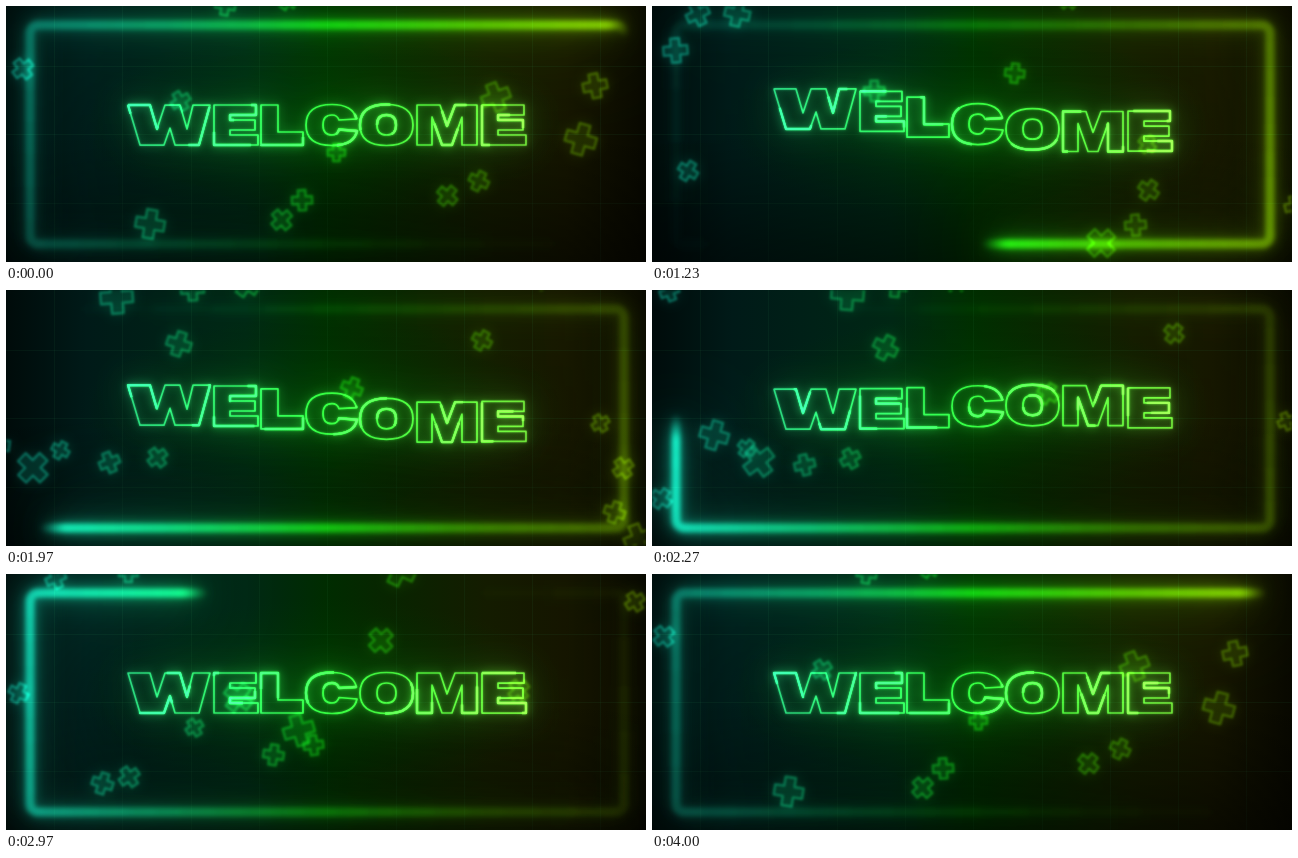
These frames come from a looping animation (640 px wide and 256 px high, 4030 ms). An HTML page with a canvas:

```html
<!DOCTYPE html>
<html lang="en">
<head>
<meta charset="utf-8">
<title>Welcome</title>
<style>
  html, body { margin: 0; width: 100%; height: 100%; overflow: hidden; background: #000; }
  canvas { display: block; width: 640px; height: 256px; }
</style>
</head>
<body>
<canvas id="stage" width="640" height="256" role="img" aria-label="WELCOME"></canvas>
<script>
const W = 640, H = 256, LOOP = 4030, TAU = 2 * Math.PI;
const ctx = document.getElementById('stage').getContext('2d');

function makeLayer() {
  const c = document.createElement('canvas');
  c.width = W;
  c.height = H;
  return c.getContext('2d');
}

// Evenly spaced colours from the left edge to the right
function ramp(...colors) {
  const g = ctx.createLinearGradient(0, 0, W, 0);
  colors.forEach((color, i) => g.addColorStop(i / (colors.length - 1), color));
  return g;
}

const neon = ramp('rgb(18,190,165)', 'rgb(15,185,110)', 'rgb(20,195,20)', 'rgb(65,160,0)', 'rgb(110,160,0)');
const textTint = ramp('rgb(40,205,150)', 'rgb(60,225,75)', 'rgb(130,225,55)');

// Static backdrop: tinted wall, grid, soft light behind the word
function paintBackdrop() {
  const b = makeLayer();
  b.fillStyle = ramp('#000b0a', '#001a18', '#002117', '#002714', '#002c00', '#0a2300', '#141c00', '#151500', '#080800');
  b.fillRect(0, 0, W, H);
  b.fillStyle = 'rgba(60,150,90,.08)';
  for (let x = 48; x < W; x += 68.3) b.fillRect(Math.round(x), 0, 1, H);
  for (let y = 60; y < H; y += 68.3) b.fillRect(0, Math.round(y), W, 1);
  b.save();
  b.translate(320, 120);
  b.scale(2.6, 1);
  const light = b.createRadialGradient(0, 0, 0, 0, 0, 95);
  light.addColorStop(0, 'rgba(0,90,0,.45)');
  light.addColorStop(1, 'rgba(0,60,0,0)');
  b.fillStyle = light;
  b.fillRect(-W, -H, 2 * W, 2 * H);
  b.restore();
  const shade = b.createLinearGradient(0, H / 2, 0, H);
  shade.addColorStop(0, 'rgba(0,0,0,0)');
  shade.addColorStop(1, 'rgba(0,0,0,.5)');
  b.fillStyle = shade;
  b.fillRect(0, 0, W, H);
  return b.canvas;
}
const backdrop = paintBackdrop();

// Draws white shapes, tints them, then adds them at several blur radii
const layer = makeLayer();
function glow(draw, tint, passes) {
  layer.clearRect(0, 0, W, H);
  layer.save();
  layer.strokeStyle = layer.fillStyle = '#fff';
  layer.lineJoin = 'round';
  draw(layer);
  layer.restore();
  layer.save();
  layer.globalCompositeOperation = 'source-in';
  layer.fillStyle = tint;
  layer.fillRect(0, 0, W, H);
  layer.restore();
  ctx.save();
  ctx.globalCompositeOperation = 'lighter';
  for (const [blur, alpha] of passes) {
    ctx.filter = blur ? `blur(${blur}px)` : 'none';
    ctx.globalAlpha = alpha;
    ctx.drawImage(layer.canvas, 0, 0);
  }
  ctx.restore();
}

// Light running clockwise round the frame. Stacked dashes of growing
// length add up to a tail that fades behind the head.
const RADIUS = 8, FRAME_W = 594, FRAME_H = 219;
const frame = new Path2D();
frame.roundRect(24, 19, FRAME_W, FRAME_H, RADIUS);
const ROUND = 2 * (FRAME_W + FRAME_H) - (8 - TAU) * RADIUS;
const DASHES = 42, TAIL = 1450, LEAD = 24, START = 590;

function drawTrail(c, t) {
  const head = START + ROUND * t / LOOP;
  c.globalCompositeOperation = 'lighter';
  c.globalAlpha = 1 / DASHES;
  c.lineWidth = 9;
  c.lineCap = 'round';
  for (let k = 1; k <= DASHES; k++) {
    const level = k / DASHES;
    const front = LEAD * level;
    const back = Math.max(front + 1, TAIL * (1 - Math.pow(level, 1 / 1.5)));
    c.setLineDash([back - front, ROUND - back + front]);
    c.lineDashOffset = back - head;
    c.stroke(frame);
  }
}

// Crosses drift from left to right; nearer ones are larger and faster.
// Each has a launch time, a height at either edge and a speed in px/ms.
const crosses = [
  [825, 15, -40, .21], [990, 11, -30, .19], [1000, 164, 179, .156], [1115, 43, 83, .202],
  [1340, 167, 200, .164], [1565, 163, 131, .134], [1580, 12, -15, .283], [1870, 180, 128, .266],
  [2015, 153, 72, .243], [2155, 2, -16, .15], [2215, 209, 177, .163], [2400, 207, 223, .169],
  [2660, 6, -14, .16], [2890, 121, 26, .153], [3450, 209, 249, .248], [3930, 61, 130, .167]
];
const SPIN = TAU / 12000, MARGIN = 25;

function tracePlus(c, size) {
  const a = size / 2 - 1, b = size * .17;
  c.beginPath();
  for (let q = 0; q < 4; q++) {
    c.lineTo(b, -b);
    c.lineTo(a, -b);
    c.lineTo(a, b);
    c.rotate(TAU / 4);
  }
  c.closePath();
}

function drawCrosses(c, t) {
  c.lineWidth = 2.6;
  crosses.forEach(([launch, from, to, speed], i) => {
    for (let age = t - launch - LOOP; age * speed < W + MARGIN; age += LOOP) {
      const x = age * speed;
      if (x < -MARGIN) continue;
      c.save();
      c.translate(x, from + (to - from) * x / W);
      c.rotate(i + SPIN * age);
      tracePlus(c, 6 + 100 * speed);
      c.globalAlpha = .1;
      c.fill();
      c.globalAlpha = .42;
      c.stroke();
      c.restore();
    }
  });
}

// Wide outlined lettering, 40 px tall
const E = 'M208 0H250V10H224V15H249V25H224V30H252V40H208Z';
const letters = [
  ['M122 0H144L151 24 159 0H174L181 24 187 0H204L193 40H169L164 23 158 40H134Z'],
  [E],
  ['M255 0H272V27H297V40H255Z'],
  ['M350.5 14C348 4 339-.5 326-.5 309-.5 300 6 300 20 300 34 309 40.5 326 40.5 339 40.5 349 36 351 26L333 24.5' +
   'C332 28 330 30 326 30 320 30 317 27 317 20 317 13 320 10 326 10 330 10 332 12 333 15Z'],
  ['M354 20C354 6 363-.5 380.5-.5S407 6 407 20 398 40.5 380.5 40.5 354 34 354 20Z' +
   'M371 20C371 13 374 10 380.5 10S390 13 390 20 387 30 380.5 30 371 27 371 20Z'],
  ['M411 0H434L441 21 449 0H471V40H456V12L446 40H436L426 12V40H411Z'],
  [E, 268]
].map(([d, dx = 0]) => ({ path: new Path2D(d), dx }));

// A short burst of bobbing that each letter repeats a little later
const TOP = 99, LAG = 70;
function lift(u) {
  const swell = Math.exp(-(((u - 1350) / 530) ** 2));
  return -17 * swell * Math.cos(TAU * (u - 1215) / 820);
}

function drawWord(c, t) {
  const lit = 50, gap = 106;
  letters.forEach(({ path, dx }, i) => {
    c.save();
    c.translate(dx, TOP + lift(t - i * LAG));
    c.globalAlpha = .7;
    c.lineWidth = 1.7;
    c.stroke(path);
    c.globalAlpha = .9;
    c.lineWidth = 2.4;
    c.setLineDash([lit, gap]);
    c.lineDashOffset = -(2 * (lit + gap) * t / LOOP + i * 37);
    c.stroke(path);
    c.restore();
  });
}

function render() {
  const t = performance.now() % LOOP;
  ctx.drawImage(backdrop, 0, 0);
  glow(c => drawCrosses(c, t), neon, [[6, .55], [1.1, .9]]);
  glow(c => drawTrail(c, t), neon, [[45, .9], [14, .6], [6, .6], [2.2, .65]]);
  glow(c => drawWord(c, t), textTint, [[16, .8], [5, .75], [1, .6], [0, .75]]);
  requestAnimationFrame(render);
}
render();
</script>
</body>
</html>
```
